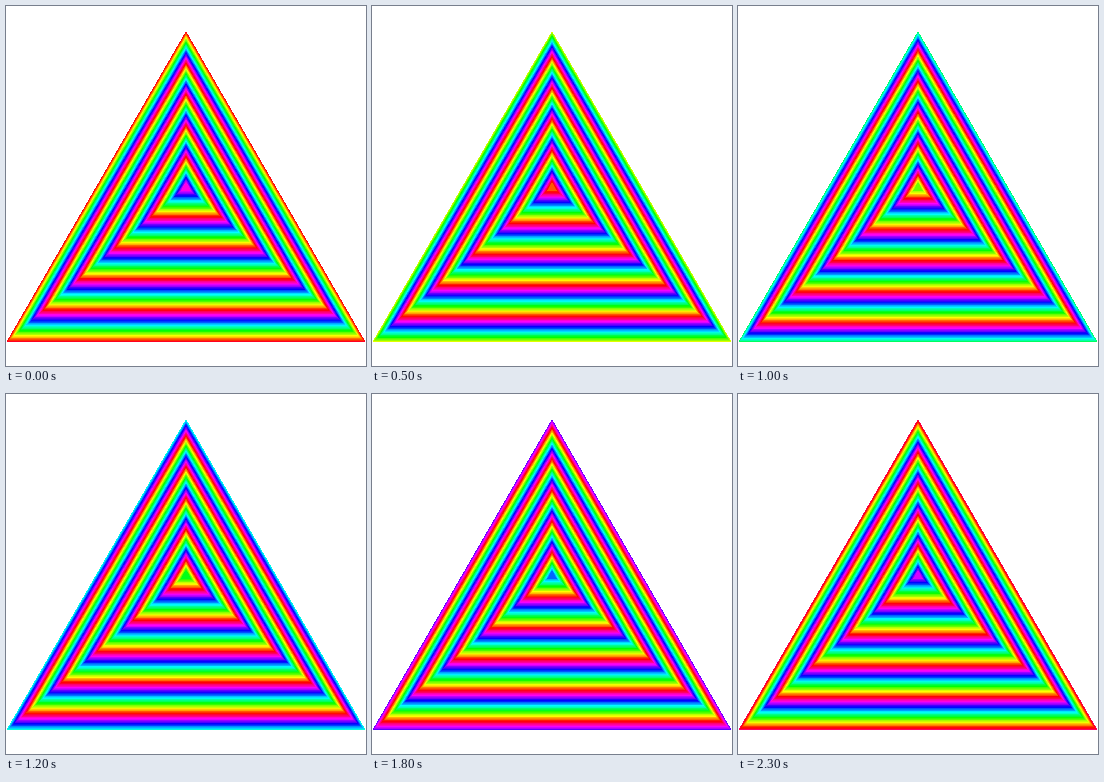
Animation of 360 by 360 pixels, one loop 2400 ms. Source, as an HTML page:

```html
<!DOCTYPE html>
<html lang="en">
<head>
<meta charset="utf-8">
<title>Rainbow triangle</title>
<style>
  html, body { margin: 0; width: 100%; height: 100%; overflow: hidden; background: #fff; }
  svg { display: block; width: 100vw; height: 100vh; }
</style>
</head>
<body>
<svg id="stage" viewBox="0 0 360 360" shape-rendering="crispEdges"></svg>
<script>
const LOOP = 2400, STEP = 100;
const CENTER = { x: 180, y: 180.5 };
const RADIUS = 155.5;                        // center to apex, and center to base
const HALF_BASE = RADIUS * 2 / Math.sqrt(3); // per unit scale: equilateral
const CYCLES = 5, PHASE = -12;
const RING = 0.75, CORE = 4;

const stage = document.getElementById('stage');
const rings = [];

function addRing(radius) {
  const half = HALF_BASE * radius / RADIUS;
  const { x, y } = CENTER;
  const shape = document.createElementNS('http://www.w3.org/2000/svg', 'polygon');
  shape.setAttribute('points',
    `${x},${y - radius} ${x + half},${y + radius} ${x - half},${y + radius}`);
  stage.append(shape);
  const depth = 1 - (radius - RING / 2) / RADIUS;
  rings.push({ shape, hue: 360 * CYCLES * depth + PHASE });
}

for (let r = RADIUS; r >= CORE; r -= RING) addRing(r);

function draw(time) {
  const turn = 360 * Math.floor(time % LOOP / STEP) * STEP / LOOP;
  for (const { shape, hue } of rings) {
    const h = ((hue + turn) % 360 + 360) % 360;
    shape.setAttribute('fill', `hsl(${h.toFixed(1)}, 100%, 50%)`);
  }
}

const start = performance.now();
function tick() {
  draw(performance.now() - start);
  requestAnimationFrame(tick);
}
tick();
</script>
</body>
</html>
```
